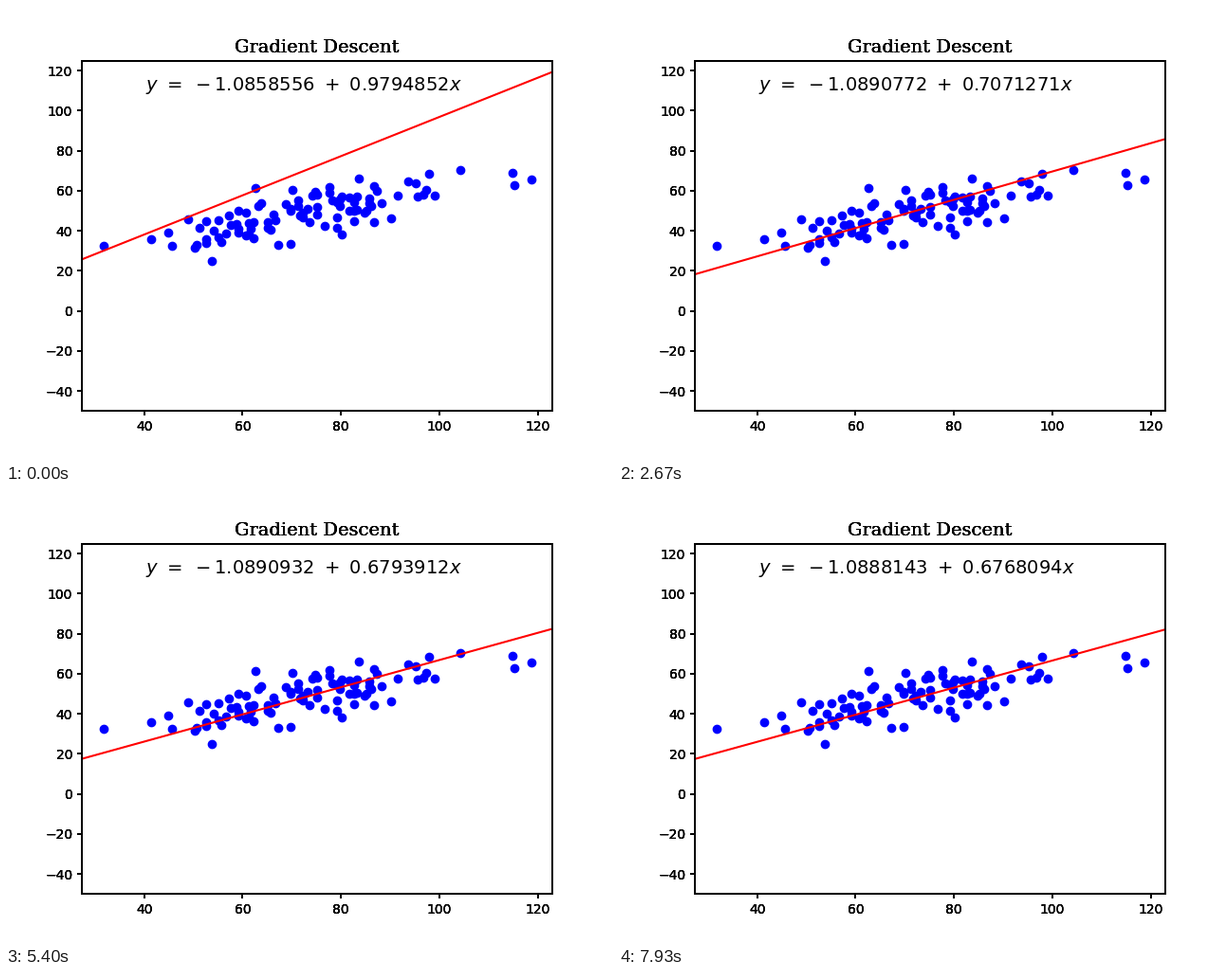
A matplotlib script that plays this animation: 640x480 px, repeating every 8000 ms.

```python
import numpy as np
import matplotlib.pyplot as plt
from matplotlib.animation import FuncAnimation

FRAMES = 120
LOOP_MS = 8000
LAYERS = 4  # stacked axes darken the antialiased edges of the labels
STROKE = 1.44
XLIM, YLIM = (27.3628, 122.9354), (-50, 125)

# Heights of the dots in the cloud, over an even grid of x
GRID_START, GRID_STEP = 50.2, 0.5
CLOUD = [
    [31.6], [33.1], [41.6], [], [], [44.6, 35.7, 33.9], [], [25.1],
    [40.2], [], [45.4, 36.9], [34.3], [], [38.8], [47.5], [43.1],
    [], [43.3], [50.1, 39.3, 41.1], [], [], [49, 37.7], [38, 43.9], [41.2],
    [44.2, 36.4], [61.5], [52.2], [53.7], [], [], [44.5, 41.7], [40.6],
    [48.1], [45.4], [32.9], [], [], [53.4], [], [50.2, 51.1, 33.6],
    [60.3], [], [55.1, 52.6], [47.5], [49.2, 46.7], [], [51.1], [44.2],
    [57.5], [59.4], [48.1, 51.9, 58.2], [], [], [42.4], [], [59, 61.9],
    [55.1], [], [46.7, 41.4, 54.3], [55.8, 52.2], [38.1, 56.9], [],
    [], [56.7, 50], [], [54.4, 44.7, 50.1], [56.9, 50.6], [66.2],
    [], [49.2], [50], [56.1, 53.7], [52.4], [62.5, 44.5], [59.8], [], [53.6],
]
# Lone dots on either side of the cloud
OUTER = [
    (31.7, 32.5), (41.4, 35.6), (44.85, 39.3), (45.6, 32.7), (48.85, 45.6),
    (90.1, 46.2), (91.5, 57.5), (93.6, 64.7), (95.2, 63.6), (95.5, 57.3),
    (96.8, 58.2), (97.4, 60.3), (97.9, 68.3), (99.05, 57.8), (104.3, 70.3),
    (114.85, 68.8), (115.2, 63), (118.6, 65.4),
]

# Moments of the data that drive the descent
MEAN_X, MEAN_Y = 72.735051, 48.958341
MEAN_XX, MEAN_XY = 5565.10989, 3685.35302
RATE = 1e-5


def descend(slope, bias, steps):
    """Return (slope, bias) before each step of gradient descent."""
    path = []
    for _ in range(steps):
        path.append((slope, bias))
        d_slope = slope * MEAN_XX + bias * MEAN_X - MEAN_XY
        d_bias = slope * MEAN_X + bias - MEAN_Y
        slope -= RATE * d_slope
        bias -= RATE * d_bias
    return path


plt.rcParams.update({
    "font.family": "DejaVu Sans",
    "axes.linewidth": STROKE,
    "xtick.major.width": STROKE,
    "ytick.major.width": STROKE,
})

fig = plt.figure(figsize=(6.4, 4.8), dpi=100, facecolor="white")
for _ in range(LAYERS):
    ax = fig.add_subplot()
    ax.set_facecolor("none")
    ax.set(xlim=XLIM, ylim=YLIM)
    ax.set_title("Gradient Descent", family="DejaVu Serif", fontsize=14)

cloud = [(GRID_START + GRID_STEP * k, y)
         for k, ys in enumerate(CLOUD) for y in ys]
ax.scatter(*zip(*cloud, *OUTER), color="b")

ends = np.array(XLIM)
line, = ax.plot(ends, ends, color="r", lw=1.5)
label = ax.text(40.2, 110, "", fontsize=14)
path = descend(0.9794852, -1.0858556, FRAMES)


def update(i):
    slope, bias = path[i]
    line.set_ydata(slope * ends + bias)
    label.set_text(rf"$y\ =\ {bias:.7f}\ +\ {slope:.7f}x$")
    return line, label


anim = FuncAnimation(fig, update, frames=FRAMES, interval=LOOP_MS / FRAMES,
                     repeat=True)
plt.show()
```
